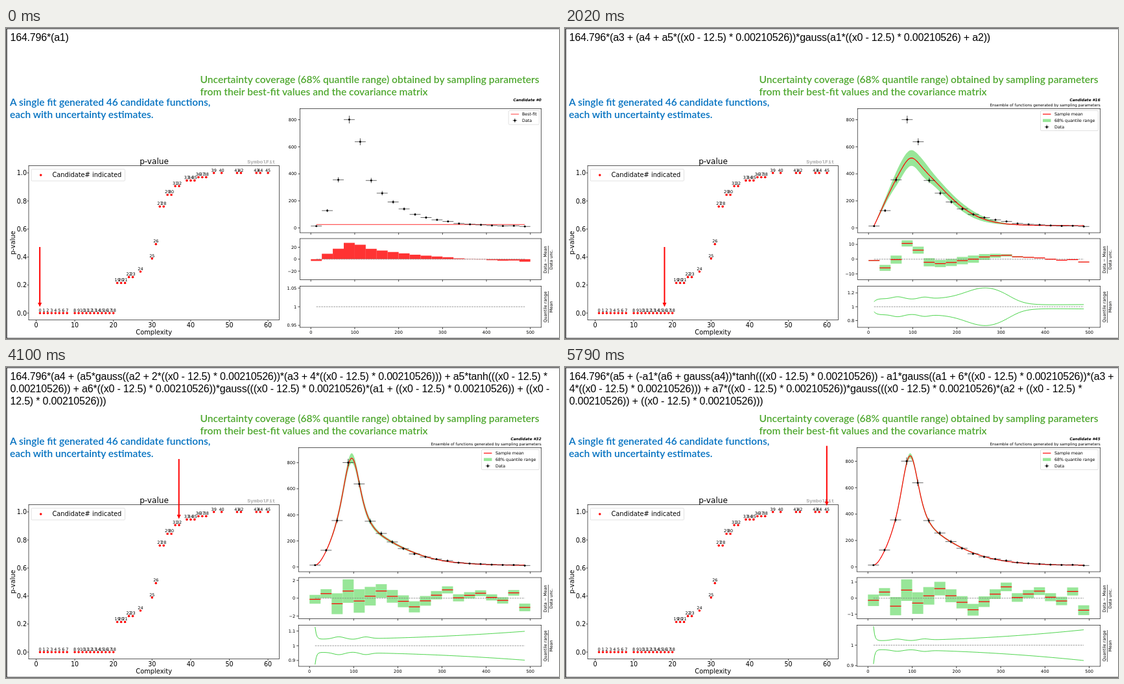
Animation, 853 px wide and 480 px high, one loop 5.92 s. Source, as an HTML page:

```html
<!DOCTYPE html>
<html lang="en">
<head>
<meta charset="utf-8">
<title>Candidate functions</title>
<style>
html, body { margin: 0; width: 100%; height: 100%; overflow: hidden; background: #fff; }
svg { position: absolute; left: 0; top: 0; width: 853px; height: 480px; font-family: "DejaVu Sans", sans-serif; }
#formula { position: absolute; left: 6.5px; top: 4.5px; width: 842px; font: 16px/19.2px "Liberation Sans", Arial, sans-serif; letter-spacing: -.195px; }
.note { font-family: Lato, "Open Sans", sans-serif; font-weight: 600; }
</style>
</head>
<body>
<svg viewBox="0 0 853 480"><g id="fixed"></g><g id="fit"></g><g id="arrow"></g></svg>
<div id="formula"></div>
<script>
const LOOP = 5920, FIRST = 70, STEP = 130;
const el = id => document.getElementById(id);
const range = n => [...Array(n).keys()];
const lerp = (a, b, w) => a + (b - a) * w;
const bell = (x, mid, width) => Math.exp(-(((x - mid) / width) ** 2));

// Straight lines through a few points
const through = (...pts) => x => {
  const i = Math.max(1, pts.findIndex(p => p[0] >= x));
  const [x0, y0] = pts[i - 1], [x1, y1] = pts[i];
  return lerp(y0, y1, Math.max(0, (x - x0) / (x1 - x0)));
};

// SVG helpers
const line = (x1, y1, x2, y2, c = '#000', w = .7, more = '') =>
  `<path d="M${x1} ${y1}L${x2} ${y2}" stroke="${c}" stroke-width="${w}" fill="none" ${more}/>`;
const rect = (x, y, w, h, fill, more = '') => `<rect x="${x}" y="${y}" width="${w}" height="${h}" fill="${fill}" ${more}/>`;
const dot = (x, y, r, c) => `<circle cx="${x}" cy="${y}" r="${r}" fill="${c}"/>`;
const text = (s, x, y, size, anchor = 'start', more = '') =>
  `<text x="${x}" y="${y}" font-size="${size}" text-anchor="${anchor}" ${more}>${s}</text>`;
const upright = (s, x, y, size) => text(s, 0, 0, size, 'middle', `transform="translate(${x} ${y}) rotate(-90)"`);
const frame = (x, y, w, h) => rect(x, y, w, h, 'none', 'stroke="#000" stroke-width=".65"');
const legend = (x, y, w, h) => rect(x, y, w, h, '#fff', 'rx="1.5" stroke="#d5d5d5" stroke-width=".7" fill-opacity=".8"');
const path = (pts, c, w) => `<polyline points="${pts.map(p => p.join()).join(' ')}" fill="none" stroke="${c}" stroke-width="${w}"/>`;
const num = v => String(+v.toFixed(4)).replace('-', '−');

// Left plot: the complexities in use and the steps of the p-value
const unused = [9, 26, 28, 29, 38, 45, 47, 49, 50, 51, 54, 55, 56, 59];
const complexity = range(61).slice(1).filter(c => !unused.includes(c));
const steps = [[46, 1], [42, .97], [39, .946], [36, .906], [34, .844], [32, .76], [31, .492], [30, .389], [27, .296], [24, .257], [21, .215], [0, 0]];
const pValue = k => steps.find(s => complexity[k] >= s[0])[1];
const px = c => 46.5 + c * 5.96;
const py = p => 440 - p * 216.3;

function drawFixed() {
  let s = `<path d="M853 1H1V479H853" fill="none" stroke="#000" stroke-width="1.2"/>`;
  const blue = 'class="note" fill="#0070c0"', green = 'class="note" fill="#4ea72e"';
  s += text('A single fit generated 46 candidate functions,', 6, 119.6, 15.5, 'start', blue);
  s += text('each with uncertainty estimates.', 6, 138.6, 15.5, 'start', blue);
  s += text('Uncertainty coverage (68% quantile range) obtained by sampling parameters', 299.5, 85.2, 15.6, 'start', green);
  s += text('from their best-fit values and the covariance matrix', 299.5, 104.2, 15.6, 'start', green);

  s += frame(35, 212.5, 386.5, 238.2);
  for (let c = 0; c <= 60; c += 10)
    s += line(px(c), 450.7, px(c), 453.2) + text(c, px(c), 462, 9.6, 'middle');
  for (let p = 0; p < 1.1; p += .2)
    s += line(32.5, py(p), 35, py(p)) + text(p.toFixed(1), 32, py(p) + 3.6, 9.6, 'end');
  s += text('p-value', 228.5, 210, 12.1, 'middle') + text('Complexity', 228.2, 472.5, 9.9, 'middle');
  s += upright('p-value', 14, 331.5, 9.9);
  s += text('SymbolFit', 415.5, 209, 8, 'end', 'font-family="Liberation Mono, monospace" font-weight="bold" fill="#aaa"');
  s += legend(39, 218, 144.5, 18) + dot(53.7, 227, 1.8, 'red') + text('Candidate# indicated', 71.5, 230.3, 9.8);
  complexity.forEach((c, k) => {
    const x = px(c), y = py(pValue(k));
    s += dot(x, y, 1.8, 'red') + text(k, x, y - 2.2, 6.4, 'middle');
  });
  el('fixed').innerHTML = s;
}

function drawArrow(k) {
  const x = px(complexity[k]) - .3, y = py(pValue(k)) - 10;
  el('arrow').innerHTML = line(x, y - 92, x, y - 5, 'red', 2) +
    `<path d="M${x - 3} ${y - 6}H${x + 3}L${x} ${y + .5}Z" fill="red"/>`;
}

// Spectrum: long tail plus a peak; the early fits see only one broad hump
const scaled = x => (x - 12.5) / 475;
const tail = x => 79850 * scaled(x) ** 2.1 * Math.exp(-10.9 * scaled(x));
const spectrum = (x, peak = 525) => 12 + tail(x) + peak / Math.cosh((x - 95) / 24.5) ** 2;
const hump = x => 18 + 3810 * scaled(x) * bell(scaled(x), 0, 1 / 3.73);

// Scatter of the data about the spectrum, in units of their error, by bin
const noise = through([0, 0], [1, .35], [2, -.5], [3, .5], [4, -.3], [6, .6], [9, -.7], [12, .7],
  [13, 0], [15, .35], [17, -.2], [18, .55], [19, -.75]);
const mid = range(20).map(i => 12.5 + 25 * i);
const data = mid.map((x, i) => Math.round(spectrum(x) + noise(i) * Math.sqrt(spectrum(x))));

// How the fit tightens from one candidate to the next
const peakOf = through([0, 490], [21, 490], [28, 520], [45, 525]);
const excess = through([0, .4], [21, .4], [32, .35], [40, 0], [45, 0]);
const floorOf = through([0, .075], [21, .075], [28, .055], [40, .025], [45, .022]);
const waveOf = through([0, .155], [21, .155], [28, .085], [32, .015], [45, .007]);
const spikeOf = through([0, .14], [28, .155], [32, .128], [40, .1], [45, .092]);

const wide = x => .01 + .115 * (1 - .6 * Math.exp((12.5 - x) / 5)) / (1 + Math.exp((x - 325) / 15)) + .19 * bell(x, 265, 62);
const wave = x => bell(x, 66, 17) + .8 * bell(x, 127, 16) - .2 * bell(x, 99, 14);

function fitAt(k) {
  const early = Math.min(1, k / 10);
  const late = k < 19 ? Math.max(0, k - 10) * .03 : Math.min(1, .3 + k / 30);
  const tight = x => spectrum(x, peakOf(k)) - excess(k) * noise(scaled(x) * 19) * Math.sqrt(spectrum(x));
  const narrow = x => floorOf(k) + .053 * scaled(x) ** 2 + waveOf(k) * wave(x) +
    (spikeOf(k) - floorOf(k)) * Math.exp((12.5 - x) / 3);
  return {
    f: x => lerp(lerp(25, hump(x), early), tight(x), late),
    r: x => lerp(lerp(.03, wide(x), early), narrow(x), late)
  };
}

function tickStep(span) {
  for (let e = .01; ; e *= 10)
    for (const s of [1, 2, 2.5, 5]) if (span / (s * e) <= 4) return s * e;
}

const RIGHT = 825.7, LIME = 'limegreen', PALE = '#98e698';
const samples = range(191).map(i => 12.5 + i * 2.5);

function drawFit(k) {
  const left = k === 0 ? 453.3 : k < 43 ? 451.2 : 450.2;
  const unit = (RIGHT - left) / 550, X = x => left + (x + 25) * unit;
  const { f, r } = fitAt(k);
  const banded = k > 0;
  const top = Math.max(840.5, ...samples.map(x => banded ? f(x) * (1 + r(x)) : 0));
  const Y = v => 308.6 - v * 175.5 / top;
  const dash = y => line(X(12.5), y, X(487.5), y, '#808080', .8, 'stroke-dasharray="2.6 1.2"');
  let s = '';

  const yTick = (y, label) => line(left - 3, y, left, y) + text(label, left - 5, y + 2.4, 6.6, 'end');
  // Symmetric ticks around a middle value
  const ticks = (cy, limit, scale, base, lo, hi) => {
    const step = tickStep(2 * limit);
    return range(9).map(i => (i - 4) * step).map(v => [cy - v * scale, v])
      .filter(([y]) => y > lo && y < hi).map(([y, v]) => yTick(y, num(base + v))).join('');
  };

  // Main panel
  if (banded) {
    const edge = q => samples.map(x => [X(x), Y(f(x) * (1 + q * r(x)))]);
    s += `<polygon points="${[...edge(1), ...edge(-1).reverse()].map(p => p.join()).join(' ')}" fill="${PALE}"/>`;
    s += path(samples.map(x => [X(x), Y(f(x))]), 'red', 1.2);
  } else s += line(X(12.5), Y(25), X(487.5), Y(25), '#ff5a5a', 1.1);
  data.forEach((d, i) => {
    const x = X(mid[i]), y = Y(d), e = Math.sqrt(d);
    s += line(X(mid[i] - 12.5), y, X(mid[i] + 12.5), y, '#000', .6) + line(x, Y(d + e), x, Y(d - e)) + dot(x, y, 1.5, '#000');
  });
  s += frame(left, 124.5, RIGHT - left, 191.5);
  for (let v = 0; v <= 800; v += 200) s += yTick(Y(v), v);

  // Residual panel
  const res = data.map((d, i) => (d - f(mid[i])) / Math.sqrt(d));
  const half = data.map((d, i) => banded ? r(mid[i]) * f(mid[i]) / Math.sqrt(d) : 0);
  const limit = (banded ? 1.1 : 1.27) * Math.max(...res.map((v, i) => Math.abs(v) + half[i]));
  const scale = 32 / limit, zero = 356.8;
  res.forEach((v, i) => {
    const x = X(25 * i), y = zero - v * scale, w = 25 * unit;
    if (banded) s += rect(x, y - half[i] * scale, w, 2 * half[i] * scale, PALE);
    else s += rect(x, Math.min(y, zero), w, Math.abs(v) * scale, '#f33');
  });
  s += dash(zero);
  if (banded) res.forEach((v, i) => { s += line(X(25 * i), zero - v * scale, X(25 * i + 25), zero - v * scale, 'red', 1.25); });
  s += frame(left, 325, RIGHT - left, 63.5) + ticks(zero, limit, scale, 0, 326, 388);

  // Quantile panel
  const mid3 = k < 43 ? 430.2 : 429.3;
  const limit3 = banded ? 1.1 * Math.max(...samples.map(r)) : .0555, scale3 = 32 / limit3;
  s += dash(mid3);
  if (banded) for (const q of [1, -1]) s += path(samples.map(x => [X(x), mid3 - q * r(x) * scale3]), LIME, .9);
  s += frame(left, 398.5, RIGHT - left, 63.5) + ticks(mid3, limit3, scale3, 1, 398.8, 461.8);

  for (let x = 0; x <= 500; x += 100) {
    for (const y of [316, 388.5, 462]) s += line(X(x), y, X(x), y + 3);
    s += text(x, X(x), 471.7, 6.6, 'middle');
  }

  // Titles and legend
  s += text('Candidate #' + k, RIGHT, 113, 5.8, 'end', 'font-weight="bold" font-style="italic"');
  if (banded) s += text('Ensemble of functions generated by sampling parameters', RIGHT, 120.8, 5.85, 'end');
  const lx = banded ? 733.5 : 775.2, ly = banded ? 152.7 : 142.7, tx = banded ? 755 : 796;
  s += legend(lx, 127.5, 822.5 - lx, banded ? 31 : 21.5);
  s += line(lx + 3.5, 133, lx + 16, 133, banded ? 'red' : '#ff5a5a', 1.2) + text(banded ? 'Sample mean' : 'Best-fit', tx, 135.3, 6.35);
  if (banded) s += rect(lx + 3.5, 140.5, 12.5, 4.6, PALE) + text('68% quantile range', tx, 145, 6.35);
  s += line(lx + 6.5, ly, lx + 13, ly) + line(lx + 9.7, ly - 3.2, lx + 9.7, ly + 3.2) + dot(lx + 9.7, ly, 1.5, '#000') + text('Data', tx, ly + 2.4, 6.35);

  const ratio = (a, b, y, h) => upright(a, 833.5, y, 6.45) + line(836.5, y - h, 836.5, y + h, '#000', .6) + upright(b, 842.5, y, 6.45);
  s += ratio('Data − Mean', 'Data unc.', 357.5, 21.5) + ratio('Quantile range', 'Mean', 430.5, 24.5);
  el('fit').innerHTML = s;
}

// Form of the function from each candidate on, U is the scaled variable
const U = '((x0 - 12.5) * 0.00210526)';
const forms = [
  [0, 'a1'], [1, 'a1*gauss(U)'], [3, 'a2*gauss(a1*U)'], [5, 'a1 + a2*gauss(U)'], [7, 'a2 + a3*gauss(a1*U)'],
  [9, 'a2 + a3*U*gauss(U)'], [10, 'a2 + a3*U*gauss(a1*U)'], [12, 'a3 + a4*U*gauss(a1*U + a2)'],
  [15, 'a3 + (a4 + a5*U)*gauss(a1*U + a2)'], [18, 'a3 + (a4*gauss(a2 + U) + a5*U)*gauss(a1*U)'],
  [20, 'a3 + (a4*gauss(a2 + a6*U) + a5*U)*gauss(a1*U)'],
  [23, 'a3 + (a4*gauss(a2 + a6*U) + a5*U)*gauss(U*(a1 + U))'],
  [26, 'a3 + (a5*U + a5*gauss(a1*U + a4))*gauss(U*(a2 + U) + U)'],
  [28, 'a3 + (a5*U + a5*gauss(a1*U + a4) + a6*tanh(U))*gauss(U*(a2 + U) + U)'],
  [31, 'a4 + (a5*gauss((a2 + 2*U)*(a3 + 4*U)) + a5*tanh(U) + a6*U)*gauss(U*(a1 + U) + U)'],
  [35, 'a4 + (a5*gauss((a1 + 4*U)*(a3 + 4*U)) + a6*U)*gauss(U*(a2 + U) + U)'],
  [38, 'a4 + (a5*gauss((a1 + 6*U)*(a3 + 4*U)) + a6*U)*gauss(U*(a2 + U) + U)'],
  [42, 'a5 + (-a1*a6*tanh(U) - a1*gauss((a1 + 6*U)*(a3 + 4*U)) + a7*U)*gauss(U*(a2 + U) + U)'],
  [45, 'a5 + (-a1*(a6 + gauss(a4))*tanh(U) - a1*gauss((a1 + 6*U)*(a3 + 4*U)) + a7*U)*gauss(U*(a2 + U) + U)']
];

let shown = -1;
function tick() {
  const t = performance.now() % LOOP;
  const k = t < FIRST ? 0 : 1 + Math.floor((t - FIRST) / STEP);
  if (k !== shown) {
    shown = k;
    const form = forms.filter(q => q[0] <= k).pop()[1];
    el('formula').textContent = `164.796*(${form.replaceAll('U', U)})`;
    drawFit(k);
    drawArrow(k);
  }
  requestAnimationFrame(tick);
}
drawFixed();
tick();
</script>
</body>
</html>
```
